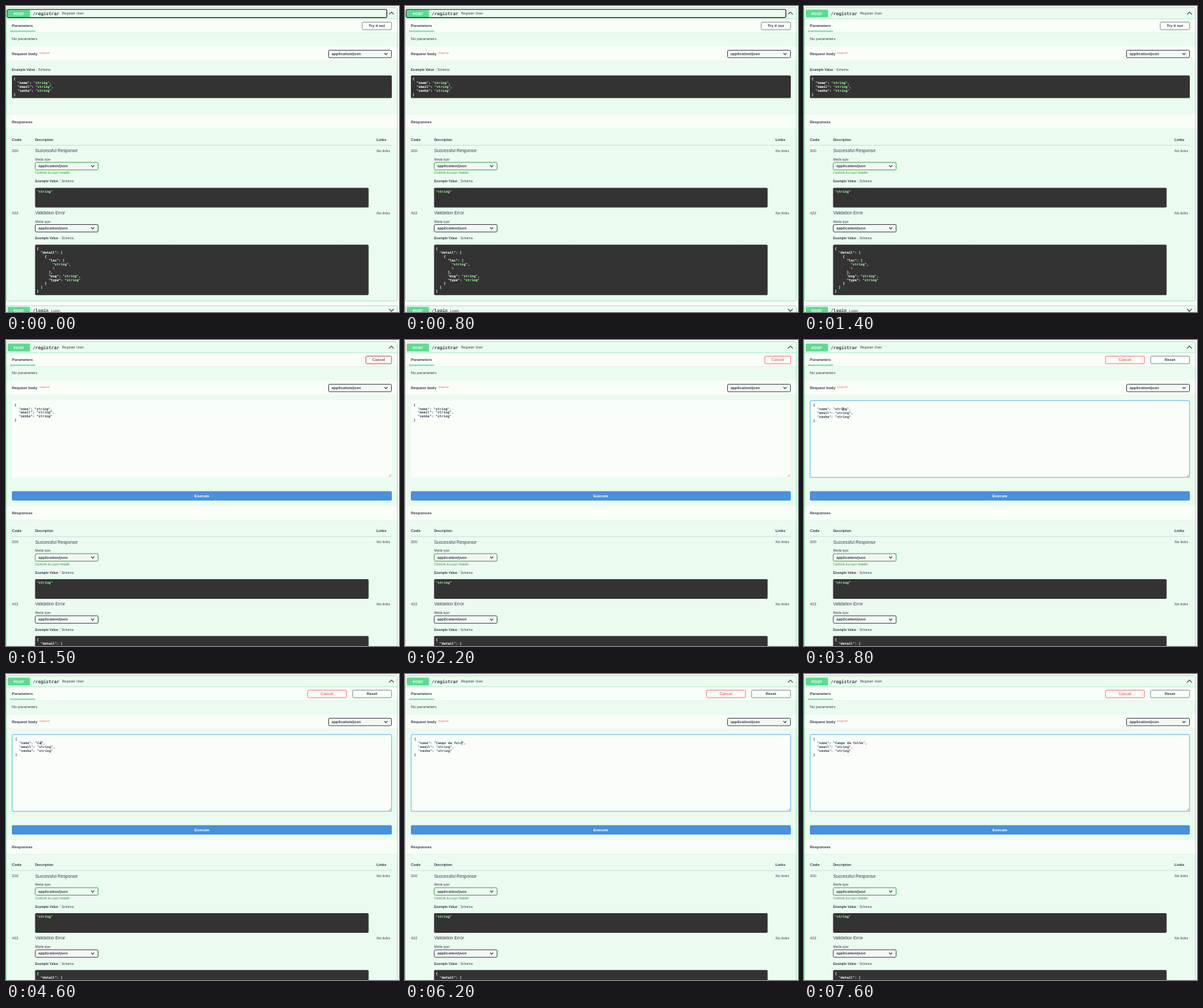
Recreate the animation shown at these times as an HTML page. Size 600x467 px, loop 8000 ms.

```html
<!DOCTYPE html>
<html lang="en">
<head>
<meta charset="utf-8">
<title>Register form</title>
<style>
  html, body { margin: 0; width: 100%; height: 100%; overflow: hidden; background: #fff; }
  svg { display: block; width: 600px; height: 467px; }
  text { font: 5.9px "Liberation Sans", Arial, sans-serif; fill: #3b4151; white-space: pre; }
  .b { font-weight: 700; }
  .mid { text-anchor: middle; }
  .it { font-style: italic; }
  .s13 { font-size: 5.5px; }
  .s12 { font-size: 5.05px; }
  .s16 { font-size: 6.74px; }
  .tiny { font-size: 4.8px; }
  .path { font: 700 6.73px "DejaVu Sans Mono", monospace; }
  .code { font: 700 5.05px "DejaVu Sans Mono", monospace; }
  .dark { fill: #fff; }
  .str { fill: #a2fca2; }
  .num { fill: #d36363; }
  .white { fill: #fff; }
  .block { fill: #ebfbf0; stroke: #7fe3a6; stroke-width: .8; }
  .badge { fill: #5ddb90; }
  .bar { fill: #f9fef9; }
  .edge { stroke: #d9e8de; stroke-width: .5; }
  .box { fill: #333; }
  .btn { fill: none; stroke: #777b83; stroke-width: .9; }
  .chev { fill: none; stroke: #30343c; stroke-width: 1.1; }
  .sel { fill: #f4f8f5; stroke: currentColor; stroke-width: 1; }

  .outline, .view, .edit, .one, .two, .focus, .mark, .caret, .shift, .body {
    animation: 8s step-end infinite;
  }
  .outline { animation-name: outline; }
  .view { animation-name: view; }
  .edit { animation-name: edit; }
  .one { animation-name: one; }
  .two { animation-name: two; }
  .focus { animation-name: focus; }
  .mark { animation-name: mark; }
  .caret { animation-name: caret; }
  .shift { animation-name: shift; }
  .body { animation-name: body; }
  .red { color: #ff6060; }
  .red rect { stroke: currentColor; }
  .red text { fill: currentColor; }
  .one .red { animation: redden 8s linear infinite; }

  @keyframes outline { 0% { visibility: visible } 15%, 100% { visibility: hidden } }
  @keyframes view { 0% { visibility: visible } 18.75%, 100% { visibility: hidden } }
  @keyframes edit { 0% { visibility: hidden } 18.75%, 100% { visibility: visible } }
  @keyframes one { 0% { visibility: hidden } 18.75% { visibility: visible } 47.5%, 100% { visibility: hidden } }
  @keyframes two { 0% { visibility: hidden } 47.5%, 100% { visibility: visible } }
  @keyframes focus { 0% { visibility: hidden } 32.5%, 100% { visibility: visible } }
  @keyframes mark { 0% { visibility: hidden } 45% { visibility: visible } 47.5%, 100% { visibility: hidden } }
  @keyframes caret {
    0% { visibility: hidden } 32.5% { visibility: visible } 45% { visibility: hidden }
    47.5% { visibility: visible } 95%, 100% { visibility: hidden }
  }
  @keyframes shift { 0% { transform: none } 18.75%, 100% { transform: translateY(87.4px) } }
  @keyframes body { 0% { transform: none } 32.5%, 100% { transform: translate(.9px, .8px) } }
  @keyframes redden { 0%, 18.75% { color: #b03a48 } 22.5%, 100% { color: #ff6060 } }
</style>
</head>
<body>
<svg viewBox="0 0 600 467">
  <defs>
    <g id="select">
      <rect class="sel" x=".5" y=".5" width="96" height="11.4" rx="1.7"/>
      <text class="b" x="5" y="8.1">application/json</text>
      <path class="chev" d="M85.8 5l2.3 2.3 2.3-2.3"/>
    </g>
    <g id="example">
      <text class="b s12">Example Value</text>
      <path d="M38.2-4.4v5.2" stroke="#b9c4bd" stroke-width=".5"/>
      <text class="s12" x="40.3">Schema</text>
    </g>
    <g id="badge">
      <rect class="badge" width="34" height="12" rx="1.4"/>
      <text class="b mid white" x="17" y="8.1">POST</text>
    </g>
  </defs>

  <rect class="block view" x=".5" y="2.5" width="597" height="447.7" rx="2"/>
  <rect class="block edit" x=".5" y="2.5" width="597" height="480" rx="2"/>

  <!-- summary row -->
  <use href="#badge" x="2.7" y="5.5"/>
  <text class="path" x="40.8" y="13.7">/registrar</text>
  <text class="s13" x="85.4" y="13.4">Register User</text>
  <path class="chev" d="M584.8 12.8l3.6-3.6 3.6 3.6"/>
  <rect class="outline" x="2" y="5.2" width="579.5" height="12.4" rx="1.5" fill="none" stroke="#15191a" stroke-width="1.1"/>

  <!-- request -->
  <path d="M.9 19.8h596.2" stroke="#7fe3a6" stroke-width=".7"/>
  <rect class="bar" x=".9" y="20.1" width="596.2" height="20.3"/>
  <path class="edge" d="M.9 40.5h596.2M.9 83.6h596.2"/>
  <text class="b" x="9" y="32.2">Parameters</text>
  <rect class="badge" x="6" y="37.6" width="38.6" height="1.7"/>
  <text x="9" y="52.4">No parameters</text>
  <rect class="bar" x=".9" y="62.3" width="596.2" height="21.1"/>
  <text class="b" x="9" y="74.8">Request body</text>
  <text x="50.4" y="72.6" style="font-size:4.4px;fill:#f55">required</text>
  <use href="#select" x="492" y="67" color="#41444e"/>

  <g class="view">
    <rect class="btn" x="543.9" y="24.7" width="44.8" height="11.4" rx="1.7"/>
    <text class="b mid" x="566.2" y="32.3">Try it out</text>
    <use href="#example" x="9" y="99.2"/>
    <rect class="box" x="9" y="106" width="580" height="34.6" rx="1.7"/>
    <g id="schema"></g>
  </g>

  <g class="one">
    <g class="red">
      <rect class="btn" x="549.3" y="24.7" width="39.4" height="11.4" rx="1.7"/>
      <text class="b mid" x="569" y="32.3">Cancel</text>
    </g>
  </g>
  <g class="two">
    <g class="red">
      <rect class="btn" x="460.4" y="24.7" width="59.4" height="11.4" rx="1.7"/>
      <text class="b mid" x="490" y="32.3">Cancel</text>
    </g>
    <rect class="btn" x="529.1" y="24.7" width="59.6" height="11.4" rx="1.7"/>
    <text class="b mid" x="558.8" y="32.3">Reset</text>
  </g>

  <g class="edit">
    <rect class="bar" x="9" y="92" width="580" height="118" rx="1.7"/>
    <path d="M584.2 208.9l3.9-3.9M586.4 208.9l1.7-1.7" stroke="#777" stroke-width=".6"/>
    <rect x="9" y="230.8" width="580" height="14.2" rx="1.7" fill="#4990dd"/>
    <text class="b mid white" x="299" y="240">Execute</text>
  </g>
  <rect class="focus" x="9.3" y="92.4" width="579.4" height="117.2" rx="1.7" fill="none" stroke="#6db3ee" stroke-width="1"/>
  <rect class="mark" x="47.3" y="102.3" width="18.3" height="5.9" fill="#b5d5fb"/>
  <g class="edit"><g class="body" id="json"></g></g>
  <path class="caret" id="caret" d="M0 102.3v5.9" stroke="#222" stroke-width=".7"/>

  <!-- responses -->
  <g class="shift">
    <rect class="bar" x=".9" y="166" width="596.2" height="21.4"/>
    <path class="edge" d="M.9 187.6h596.2"/>
    <text class="b" x="9" y="178.6">Responses</text>
    <text class="b" x="9" y="206">Code</text>
    <text class="b s12" x="44.4" y="205.5">Description</text>
    <text class="b" x="565.4" y="206">Links</text>
    <path d="M9 212.5h580" stroke="#b4c1b9" stroke-width=".5"/>

    <text x="9" y="222.6">200</text>
    <text class="s16" x="44.4" y="223.2">Successful Response</text>
    <text class="it" x="565.4" y="222.6">No links</text>
    <text class="tiny" x="44.4" y="235.9">Media type</text>
    <use href="#select" x="44.2" y="238.2" color="#43a047"/>
    <text class="tiny" x="44.4" y="256.4" style="fill:#2b9a35">Controls <tspan style="font-family:'DejaVu Sans Mono',monospace">Accept</tspan> header.</text>
    <use href="#example" x="44.4" y="269.1"/>
    <rect class="box" x="44.4" y="277.5" width="509.2" height="30" rx="1.7"/>
    <g id="ok"></g>

    <text x="9" y="317.5">422</text>
    <text class="s16" x="44.4" y="318.1">Validation Error</text>
    <text class="it" x="565.4" y="317.5">No links</text>
    <text class="tiny" x="44.4" y="330.6">Media type</text>
    <use href="#select" x="44.2" y="333" color="#41444e"/>
    <use href="#example" x="44.4" y="356.2"/>
    <rect class="box" x="44.4" y="364.3" width="509.2" height="77" rx="1.7"/>
    <g id="error"></g>

    <rect class="block" x=".5" y="457.3" width="597" height="18" rx="2"/>
    <use href="#badge" x="2.7" y="459.3"/>
    <text class="path" x="40.8" y="467">/login</text>
    <text class="s13" x="69" y="466.6">Login</text>
    <path class="chev" d="M584.8 462.4l3.6 3.6 3.6-3.6"/>
  </g>
</svg>
<script>
const $ = id => document.getElementById(id);
const CHAR = 5.05 * .602;

// Lays out code lines; dark blocks colour string values and numbers.
function code(id, x, y, pitch, lines, dark = true) {
  $(id).innerHTML = lines.map((line, i) => {
    const body = dark
      ? line.replace(/"\w+"(?!:)|\b\d+\b/g, m => `<tspan class="${m[0] === '"' ? 'str' : 'num'}">${m}</tspan>`)
      : line;
    return `<text class="code${dark ? ' dark' : ''}" x="${x}" y="${y + i * pitch}">${body}</text>`;
  }).join('');
}

const body = name => ['{', `  "nome": "${name}",`, '  "email": "string",', '  "senha": "string"', '}'];
code('schema', 11.6, 113.2, 5.9, body('string'));
code('json', 13.1, 100.7, 5.8, body('string'), false);
code('ok', 47, 284.8, 5.95, ['"string"']);
code('error', 47, 371.9, 5.95, [
  '{', '  "detail": [', '    {', '      "loc": [', '        "string",', '        0',
  '      ],', '      "msg": "string",', '      "type": "string"', '    }', '  ]', '}'
]);

const typing = [
  [0, 'string'], [3800, 'C'], [4000, 'Ca'], [4600, 'Camp'], [4700, 'Campo'],
  [5000, 'Campo d'], [5100, 'Campo da '], [5600, 'Campo da f'], [5900, 'Campo da fo'],
  [6000, 'Campo da fol'], [6100, 'Campo da folc'], [6200, 'Campo da folca'],
  [6700, 'Campo da fol'], [6800, 'Campo da fo'], [6900, 'Campo da fol'], [7000, 'Campo da folha']
];
const field = $('json').children[1];
const clock = $('caret').getAnimations()[0];

function draw() {
  const t = (clock.currentTime || 0) % 8000;
  const name = typing.findLast(([start]) => t >= start)[1];
  const line = body(name)[1];
  if (field.textContent !== line) field.textContent = line;
  const column = 11 + (t < 3800 ? 4 : name.length);
  $('caret').setAttribute('transform', `translate(${14.1 + column * CHAR})`);
  requestAnimationFrame(draw);
}
draw();
</script>
</body>
</html>
```
